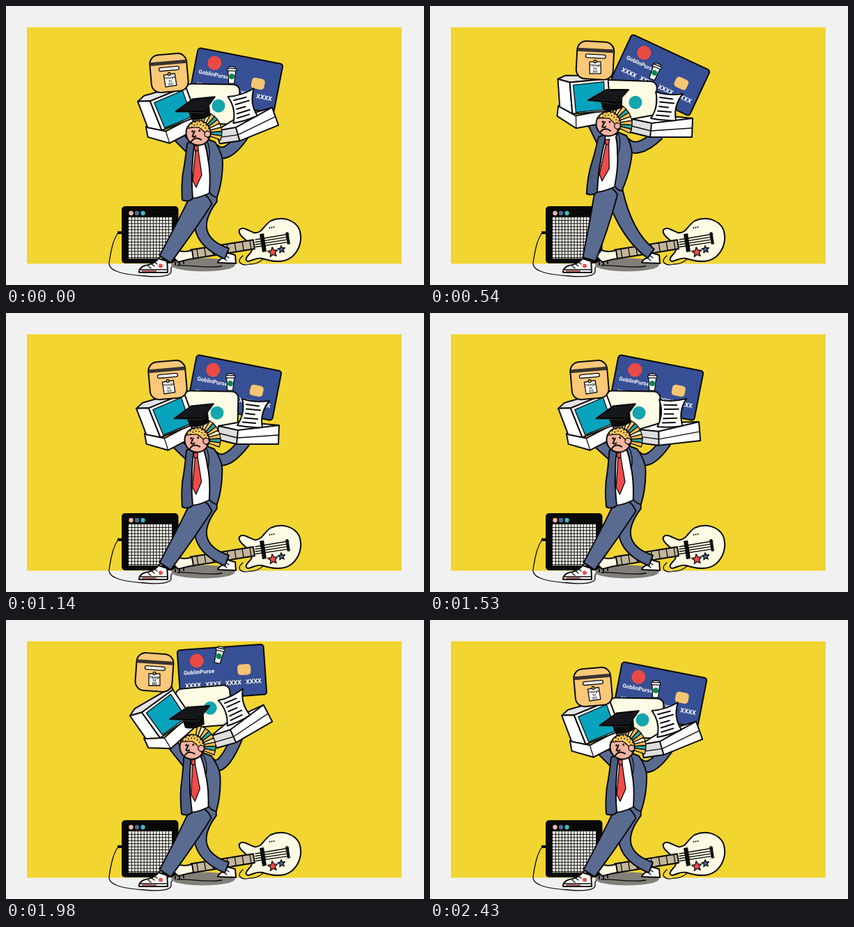
An HTML page that plays this animation: 600x400 px, repeating every 2460 ms.

```html
<!DOCTYPE html>
<html lang="en">
<head>
<meta charset="utf-8">
<title>Heavy load</title>
<style>
html, body { margin: 0; width: 100%; height: 100%; overflow: hidden; background: #f1f1f1; }
svg { display: block; width: 600px; height: 400px; }
.o { stroke: #0b0b0b; stroke-width: 2; stroke-linejoin: round; stroke-linecap: round; }
.l { fill: none; }
.thin { stroke-width: 1.3; }
.suit { fill: #5a6b92; }
.w { fill: #fff; }
.cream { fill: #fdfbe4; }
.card { font: 700 8px Roboto, sans-serif; fill: #fff; }
.digits { font-size: 9px; }
.note { font: 700 4.5px Inter, sans-serif; fill: #111; text-anchor: middle; }
</style>
</head>
<body>
<svg viewBox="0 0 600 400">
  <rect width="600" height="400" fill="#f1f1f1"/>
  <rect x="30" y="30.500" width="538" height="339" fill="#f2d530"/>

  <g id="amp">
    <path class="o l thin" d="M161 325C154 335 151 348 148 368C147 380 168 385 198 387C220 389 239 388 237 379C236 374 240 371 246 371"/>
    <rect x="160" y="323" width="8" height="4"/>
    <rect x="166" y="287" width="81.500" height="82" rx="5" fill="#080808"/>
    <circle cx="179.500" cy="297" r="3.200" fill="#f0b9a5"/>
    <circle cx="188" cy="297" r="3.200" fill="#4c6996"/>
    <circle cx="196.500" cy="297" r="3.200" fill="#3fb9c4"/>
    <rect x="176" y="303" width="62" height="59" fill="#fdfaf0"/>
    <path id="grille" stroke="#111" fill="none"/>
  </g>

  <ellipse cx="283" cy="371" rx="46" ry="9.500" fill="#827f79"/>

  <g id="guitar">
    <path class="o l thin" d="M246 372C270 371 285 377 310 373M340 358C328 368 340 373 350 370C358 371 364 367 369 363"/>
    <path class="o cream" d="M335 321C340 315 349 323 356 325C367 327 370 314 380 308C396 301 414 306 421 320C426 334 422 350 410 360C398 369 380 366 368 362C360 360 354 365 348 366C342 365 345 360 349 356C354 351 354 348 350 343C347 335 332 329 335 321Z"/>
    <g transform="translate(266 356) rotate(-9)">
      <rect class="o" y="-6.500" width="91" height="13" fill="#c3b69b"/>
      <path id="frets" class="o l thin"/>
    </g>
    <path class="o cream" d="M239 359L246 350Q256 354 267 350L269 362Q258 364 247 367Z"/>
    <path class="o l" d="M243 368v3M249 367v4M255 365v4"/>
    <path id="strings" class="o l thin"/>
    <path d="M364 327l6-1l4 26l-6 1zM401 325l4-1l3 17l-4 1z" fill="#0b0b0b"/>
    <circle cx="378.500" cy="318" r="1"/><circle cx="381.500" cy="317.500" r="1"/><circle cx="384.500" cy="317" r="1"/>
    <path id="starA" class="o thin" fill="#ee4b4b"/>
    <path id="starB" class="o thin" fill="#4c6092"/>
  </g>

  <path class="o w" d="M304 368Q306 362 313 361L318 354L329 357L330 369Z"/>
  <path class="o l thin" d="M313 362l4 3M316 358l4 3"/>
  <path id="legR" class="o suit"/>
  <path class="o w" d="M191 382Q191 373 205 371Q215 368 219 362L231 366Q232 374 232 382Z"/>
  <path class="o l thin" d="M192 378H231M204 373l4 3M209 370l4 3M213 367l4 3"/>
  <path d="M195 380H216" stroke="#a33" stroke-width="1.500"/>
  <circle cx="222" cy="372.500" r="3" fill="#ee4b4b"/>
  <path id="legL" class="o suit"/>

  <path id="armLo" class="l" stroke="#0b0b0b" stroke-width="17"/>
  <path id="armL" class="l" stroke="#5a6b92" stroke-width="13"/>
  <path id="armRo" class="l" stroke="#0b0b0b" stroke-width="18"/>
  <path id="armR" class="l" stroke="#5a6b92" stroke-width="14"/>

  <g id="torso">
    <path class="o w" d="M-10 0L10 -4L18 70Q2 79 -12 80Z"/>
    <path class="o thin" fill="#ee4b4b" d="M-9 5L-2 4L-2 11L3 46L-5 64L-10 54L-6 12Z"/>
    <path class="o l thin" d="M-6 12L-2 11"/>
    <path class="o" fill="#4e5f85" d="M-9 -3L-18 1Q-20 20 -22 32Q-27 55 -25 82Q-17 86 -10 80Q-12 50 -11 40Q-10 18 -8 6Z"/>
    <path class="o suit" d="M9 -6L22 -1Q33 16 33 28Q33 55 25 78Q19 78 14 71Q16 42 12 24Q10 8 7 1Z"/>
    <path class="o l thin" d="M9 -6Q17 10 13 25"/>
  </g>

  <g id="card">
    <rect class="o" x="-62" y="-36" width="124" height="72" rx="4" fill="#374f94"/>
    <circle cx="-35" cy="-19" r="10" fill="#ea4a45"/>
    <text class="card" x="-55" y="0">GoblinPurse</text>
    <rect x="22.500" y="-9.500" width="19" height="15.500" rx="4.500" fill="#f6c573"/>
    <g id="digits"></g>
  </g>

  <g id="cup">
    <path class="o w thin" d="M-5.500 -7L5.500 -7L4 12H-4Z"/>
    <rect class="o w thin" x="-6.500" y="-9.500" width="13" height="3.500" rx="1"/>
    <path class="o w thin" d="M-5 -9.500L-4 -12H4L5 -9.500Z"/>
    <circle cy="2" r="4" fill="#0d8452"/>
  </g>

  <g id="screen">
    <rect class="o cream" x="-39" y="-28" width="78" height="57" rx="9"/>
    <circle cx="9" cy="3" r="9.500" fill="#14a5ae"/>
  </g>

  <g id="comp">
    <path class="o w" d="M-44 12L-19 27L23 20V38L-19 45L-46 27Z"/>
    <path class="o l thin" d="M-19 27V45"/>
    <path class="o" fill="#e4e4e4" d="M-44 -26L-33 -31L29 -29L28 -25L-27 -21Z"/>
    <path class="o w" d="M-44 -26L-27 -21L-24 24L-42 14Z"/>
    <path class="o w" d="M-27 -21L28 -25L30 21L-24 24Z"/>
    <path class="o thin" fill="#08a3bd" d="M-22 -17L22 -21L23 19L-19 22Z"/>
  </g>

  <g id="box">
    <rect class="o" x="-26.500" y="-27" width="53" height="54" rx="13" fill="#fac877"/>
    <path d="M-26 -17H26V-12H-26Z" fill="#3a3330"/>
    <rect class="o w thin" x="-14" y="-8.500" width="29" height="5" rx="2.500"/>
    <g transform="rotate(-4)">
      <rect class="o w thin" x="-8" y="2" width="16" height="17"/>
      <circle class="o thin" cy="1.500" r="2" fill="#f2d530"/>
      <text class="note" y="8.500">Things</text>
      <text class="note" y="13">to</text>
      <text class="note" y="17.500">DO</text>
    </g>
  </g>

  <g id="base">
    <path class="o w" d="M-43 -12L-10 -18L44 -13L43 14L-17 14L-45 7Z"/>
    <path class="o" fill="#dedede" d="M-43 -12L-15 -6L-17 14L-45 7Z"/>
    <path class="o l" d="M-15 -6L44 -13"/>
    <path class="o l thin" d="M-44 -2L-16 5L43 1"/>
    <g transform="translate(7 -31)">
      <path class="o w" d="M-16 -20Q2 -14 23 -17Q9 0 13 21Q-5 22 -23 18Q-11 0 -16 -20Z"/>
      <path class="o l" d="M-10 -12L8 -9.500M-10 -5.500L10 -3.500M-11 1L2 2.500M-13 7.500L6 9M-15 13.500L3 15"/>
    </g>
  </g>

  <g id="head">
    <g id="fan"></g>
    <circle class="o" r="17.500" fill="#f4b2a0"/>
    <path class="o thin" fill="#f8c659" d="M-16 -8Q-8 -20 6 -17Q18 -11 18 4L13 9Q10 -2 1 -8Q-8 -9 -16 -8Z"/>
    <g id="dots"></g>
    <circle class="o thin" cx="13" cy="3" r="4.300" fill="#f4b2a0"/>
    <circle cx="-8" cy="-3" r="1.500"/><circle cx="2" cy="-3" r="1.500"/>
    <path class="o l" stroke-width="1.600" d="M-5 -3L-9 4Q-6 6 -4 4M-11 11Q-5 4 3 10"/>
    <g id="hat">
      <path d="M-13 0L19 -2L19 13Q4 20 -9 16Z" fill="#0b0b0b"/>
      <path d="M-30 2L-4 -13L28 -13L11 6Z" fill="#16171a" stroke="#000" stroke-width="2" stroke-linejoin="round"/>
      <path d="M-27 3L10 8L26 -11" fill="none" stroke="#454545" stroke-width=".7"/>
    </g>
  </g>
</svg>
<script>
const LOOP = 2460, STEP = 30;
const $ = id => document.getElementById(id);
const set = (id, d) => $(id).setAttribute('d', d);
const range = n => [...Array(n).keys()];

const smooth = u => u * u * (3 - 2 * u);
const fling = u => 1 + 2.3 * (u - 1) ** 3 + 1.3 * (u - 1) ** 2;
const drop = u => u * u;

// up: knees straighten, flat: right tray levels, ease: leads into the next pose
const rest = { up: 0, sway: 0, flat: 0, drift: 0, toss: 0, ease: smooth };
const poses = [
  { t: 0 },
  { t: 540, up: 1, flat: 1 },
  { t: 780, up: 1, flat: 1, sway: 1 },
  { t: 1140, flat: 1, drift: -2 },
  { t: 1530, flat: .7, drift: -5, ease: fling },
  { t: 1980, toss: 1, ease: drop },
  { t: 2430 }
].map(p => ({ ...rest, ...p }));

// x, y, angle at rest, then the change when standing and when tossed
const parts = {
  card: { at: [330, 107, 11], up: [1, -8, 14], toss: [-20, -32, -15] },
  cup: { at: [324, 99, 2], up: [-1, -5, 20], toss: [-18, -49, 12], sway: [12, 5, 13] },
  screen: { at: [296, 140, 1], up: [-10, -5, 1], toss: [-12, -16, -6] },
  comp: { at: [239, 148, -18], up: [-11, -18, 17], toss: [-10, -12, -14], sway: [13, 4, -4] },
  box: { at: [234, 96, -5], up: [3, -18, 8], toss: [-21, -21, 9], sway: [20, -1, 13] },
  base: { at: [346, 174, -22], up: [-17, 0, 0], toss: [-8, -19, -8], flat: [4, 0, 22] },
  head: { at: [276, 182, -6], up: [-20, -13, 6], toss: [-9, 0, 2] }
};
const neckJoint = { at: [278, 196], up: [-18, -9], toss: [-5, 0] };
const hipJoint = { at: [278, 276], up: [-28, -9], toss: [-1, 0], sway: [8, 0] };
const kneeL = { at: [262, 310], up: [-19, 5], sway: [2, 0] };
const kneeR = { at: [257, 332], up: [24, -4], sway: [-3, 2] };

function poseAt(t) {
  const i = Math.max(0, poses.findLastIndex(p => t >= p.t));
  const a = poses[i], b = poses[i + 1] || poses[0];
  const u = i === poses.length - 1 ? 0 : a.ease((t - a.t) / (b.t - a.t));
  const p = {};
  for (const k of ['up', 'sway', 'flat', 'drift', 'toss']) p[k] = a[k] + (b[k] - a[k]) * u;
  return p;
}

function place(part, p) {
  const { at, up, toss = [0, 0], sway = [10, 3, 2], flat = [0, 0, 0] } = part;
  return at.map((v, k) => v + up[k] * p.up + toss[k] * p.toss + sway[k] * p.sway + flat[k] * p.flat);
}

function star(x, y, r) {
  return 'M' + range(10).map(i => {
    const q = i % 2 ? r * .45 : r, a = i * Math.PI / 5 - 1.7;
    return (x + q * Math.cos(a)) + ' ' + (y + q * Math.sin(a));
  }).join('L') + 'Z';
}

function build() {
  const gap = 62 / 14;
  set('grille', range(13).map(i => {
    const s = (i + 1) * gap;
    return `M${176 + s} 303V362M176 ${303 + s}H238`;
  }).join(''));
  set('frets', range(8).map(i => `M${9 + i * 11} -6V6`).join(''));
  set('strings', range(4).map(i => `M358 ${335 + i * 3.5}L406 ${327 + i * 3.8}`).join(''));
  set('starA', star(383, 353, 7.5));
  set('starB', star(395.5, 349, 5.5));
  $('digits').innerHTML = range(4)
    .map(i => `<text class="card digits" x="${-54 + i * 29}" y="19">XXXX</text>`).join('');

  const hues = ['#f9bd52', '#fdf1c9', '#f9bd52', '#2aa79f'];
  const at = (r, a) => (3 + r * Math.cos(a)) + ' ' + (r * Math.sin(a));
  $('fan').innerHTML = range(9).map(i => {
    const a = -1.35 + i * .2, b = a + .2;
    return `<path class="o thin" fill="${hues[i % 4]}" d="M${at(14, a)}L${at(31, a)}L${at(31, b)}L${at(14, b)}Z"/>`;
  }).join('');

  $('dots').innerHTML = range(16).map(i => {
    const row = i % 2, a = -2.45 + (i - row) * .18 + row * .16, r = 16 - row * 3.4;
    return `<circle cx="${r * Math.cos(a)}" cy="${r * Math.sin(a)}" r=".9"/>`;
  }).join('');
}

// Tapered leg through hip, knee and ankle with a rounded top
function limb(pts, widths) {
  const side = s => pts.map((p, i) => {
    const a = pts[Math.max(0, i - 1)], b = pts[Math.min(2, i + 1)];
    const dx = b[0] - a[0], dy = b[1] - a[1], k = s * widths[i] / 2 / Math.hypot(dx, dy);
    return `${p[0] - dy * k} ${p[1] + dx * k}`;
  });
  const l = side(1), r = side(-1);
  const cap = pts[0].map((v, k) => v + (v - pts[1][k]) * .35).join(' ');
  return `M${l[0]}Q${l[1]} ${l[2]}L${r[2]}Q${r[1]} ${r[0]}Q${cap} ${l[0]}Z`;
}

function draw(t) {
  const p = poseAt(t), spot = {};
  for (const id in parts) {
    const [x, y, r] = spot[id] = place(parts[id], p);
    $(id).setAttribute('transform', `translate(${x + p.drift} ${y}) rotate(${r})`);
  }
  $('hat').setAttribute('transform', `translate(1 ${-36 - 8 * p.toss})`);

  const [nx, ny] = place(neckJoint, p), [hx, hy] = place(hipJoint, p);
  const tx = nx + p.drift / 2;
  $('torso').setAttribute('transform', `matrix(1 0 ${(hx - tx) / 80} ${(hy - ny) / 80} ${tx} ${ny})`);

  set('legL', limb([[hx + 3, hy], place(kneeL, p), [228.5, 363]], [33, 28, 19]));
  set('legR', limb([[hx + 14, hy - 2], place(kneeR, p), [317, 355]], [25, 19, 16]));

  const { comp, base } = spot;
  const left = `M${tx - 12} ${ny + 10}L${comp[0] + p.drift + 5} ${comp[1] + 36}`;
  const right = `M${tx + 19} ${ny + 8}Q${tx + 36} ${ny + 28} ${base[0] + p.drift - 5} ${base[1] + 10}`;
  for (const s of ['', 'o']) {
    set('armL' + s, left);
    set('armR' + s, right);
  }
}

build();
const start = performance.now();
function tick() {
  const t = (performance.now() - start) % LOOP;
  draw(Math.floor(t / STEP) * STEP);
  requestAnimationFrame(tick);
}
draw(0);
requestAnimationFrame(tick);
</script>
</body>
</html>
```
